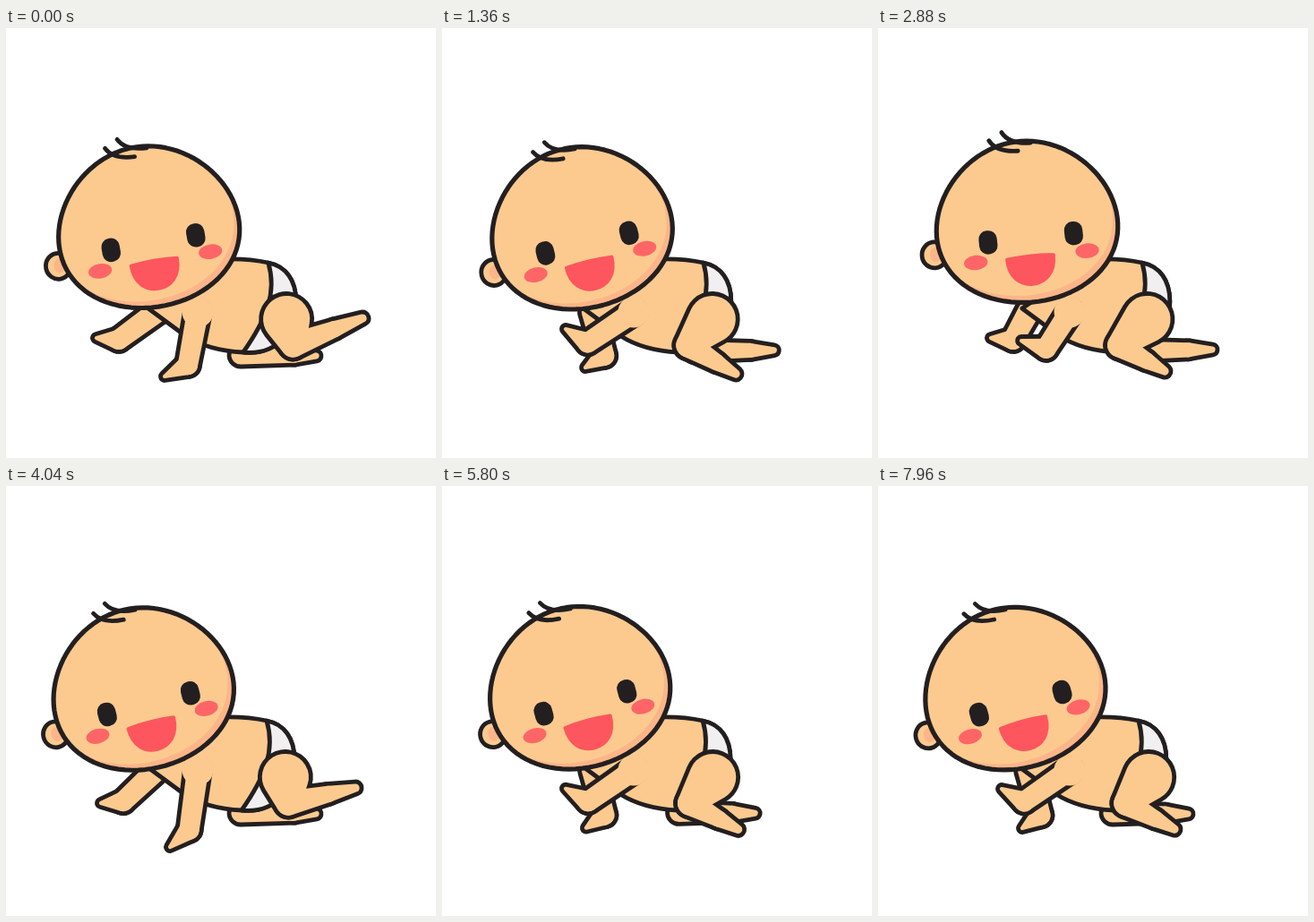
Recreate the animation shown at these times as an HTML page with a canvas. Size 480 by 480 pixels, loop 8 s.

```html
<!DOCTYPE html>
<html lang="en">
<head>
<meta charset="utf-8">
<title>Crawling baby</title>
<style>
html, body { margin: 0; width: 100%; height: 100%; overflow: hidden; background: #fff; }
canvas { display: block; width: 480px; height: 480px; }
</style>
</head>
<body>
<canvas id="stage" width="480" height="480"></canvas>
<script>
const ctx = document.getElementById('stage').getContext('2d');
const LOOP = 8000, STEP = 40, CRAWL = 2135, LINE = 4.8;
const INK = '#231f20', SKIN = '#fcca8f', SHADE = '#fcb588', BLUSH = '#fe6567', RED = '#fd565e', CLOTH = '#f1efef';
const RAD = Math.PI / 180;

// Key moments of one crawl: tips of the hands and near foot, and how far the far foot trails
const crawl = [
  { at: 0, near: [177, 389], far: [101, 346], toe: [398, 324], trail: 0 },
  { at: 315, near: [173, 384], far: [100, 338], toe: [392, 340], trail: .9 },
  { at: 745, near: [160, 349], far: [126, 346], toe: [320, 383], trail: 1 },
  { at: 1360, near: [138, 336], far: [160, 379], toe: [328, 386], trail: .9 },
  { at: 1555, near: [138, 338], far: [161, 382], toe: [331, 383], trail: 0 },
  { at: 1905, near: [183, 403], far: [106, 354], toe: [390, 337], trail: 0 }
];

const mix = (a, b, u) => a + (b - a) * u;
const mixPoint = (p, q, u) => [mix(p[0], q[0], u), mix(p[1], q[1], u)];

function poseAt(t) {
  const phase = t % CRAWL;
  const i = crawl.findLastIndex(key => key.at <= phase);
  const a = crawl[i], b = crawl[(i + 1) % crawl.length];
  const u = (phase - a.at) / ((b.at || CRAWL) - a.at);
  return {
    near: mixPoint(a.near, b.near, u),
    far: mixPoint(a.far, b.far, u),
    toe: mixPoint(a.toe, b.toe, u),
    trail: mix(a.trail, b.trail, u)
  };
}

// Head sway from -1 to 1; it starts smaller and ahead of the steady rhythm
function swayAt(t) {
  const lead = .9 * Math.max(0, 1 - (t / 2400) ** 2);
  const size = mix(.65, 1, Math.min(1, t / 2900));
  return size * Math.cos(2 * Math.PI * (t - 4940) / 2060 + lead);
}

function paint(path, fill, width = LINE, color = INK) {
  if (fill) { ctx.fillStyle = fill; ctx.fill(path); }
  if (width) { ctx.lineWidth = width; ctx.strokeStyle = color; ctx.stroke(path); }
}

function oval(x, y, rx, ry, fill, width = 0) {
  const path = new Path2D();
  path.ellipse(x, y, rx, ry, 0, 0, 2 * Math.PI);
  paint(path, fill, width);
}

// Tapered capsule around two circles
function capsule([ax, ay], ra, [bx, by], rb) {
  const path = new Path2D(), angle = Math.atan2(by - ay, bx - ax);
  const open = Math.acos((ra - rb) / Math.hypot(bx - ax, by - ay));
  path.arc(ax, ay, ra, angle + open, angle - open + 2 * Math.PI);
  path.arc(bx, by, rb, angle - open, angle + open);
  path.closePath();
  return path;
}

// Chain of joints [point, radius] with one common outline
function limb(...joints) {
  for (const [grow, color] of [[LINE / 2, INK], [-LINE / 2, SKIN]]) {
    for (let i = 1; i < joints.length; i++) {
      const [a, ra] = joints[i - 1], [b, rb] = joints[i];
      paint(capsule(a, ra + grow, b, rb + grow), color, 0);
    }
  }
}

// The hand tilts with its height above or below its rest level
function arm(shoulder, tip, length, level) {
  const tilt = 1.1 * (level - tip[1]) * RAD;
  const wrist = [tip[0] + length * Math.cos(tilt), tip[1] + length * Math.sin(tilt)];
  limb([shoulder, 14.5], [wrist, 13.5], [tip, 4.5]);
}

function nearLeg(toe) {
  const knee = [271 + .65 * (toe[0] - 322), 354];
  const hip = [301 + .25 * (knee[0] - 272), 325];
  limb([hip, 28.5], [knee, 16], [mixPoint(knee, toe, .6), 11.5], [toe, 7]);
}

function farLeg(trail) {
  const knee = [262 + 22 * trail, 365 - 5 * trail];
  const toe = [346 + 27 * trail, 366 - 7 * trail];
  limb([knee, 13], [mixPoint(knee, toe, .7), 10.5], [toe, 6]);
}

const bum = 'C312,266 323,282 323,305 C323,335 305,366 264,362';
const torso = new Path2D('M240,258 Q270,257 292,262 ' + bum + ' Q225,360 200,344 L158,313 Z');
const diaper = new Path2D('M292,262 ' + bum + ' C290,325 302,295 292,262 Z');
const mouth = new Path2D('M-26,40 Q0,37 26,40 C26,60 14,70 0,70 C-14,70 -26,60 -26,40 Z');
const hair = new Path2D('M-17,-102 Q-10,-88 14,-87');

// Egg shape, wider towards the chin
const skull = new Path2D();
for (let a = 0; a < 360; a += 4) {
  const s = Math.sin(a * RAD);
  skull.lineTo(101 * Math.cos(a * RAD) * (1 + .09 * s), 90 * s);
}
skull.closePath();

function drawBody(t) {
  const pose = poseAt(t), shoulder = [214, 317];
  farLeg(pose.trail);
  arm([168, 317], pose.far, 25, 350);
  ctx.save();
  ctx.translate(.8 + 2 * swayAt(t), 0);
  paint(torso, SKIN);
  paint(diaper, CLOTH);
  ctx.restore();
  nearLeg(pose.toe);
  arm(shoulder, pose.near, 29, 365);
  oval(...shoulder, 17.5, 17.5, SKIN);
}

function drawHead(t) {
  ctx.save();
  ctx.translate(158.5 + 7.2 * swayAt(t), 221 - 5 * swayAt(t - 80));
  ctx.rotate((4.6 * swayAt(t + 80) - 10.6) * RAD);

  oval(-106, 26, 14, 14.5, SKIN, LINE);
  oval(-105, 26, 6, 8, SHADE);

  ctx.save();
  ctx.clip(skull);
  paint(skull, SHADE, 0);
  ctx.translate(-5, -8);
  paint(skull, SKIN, 0);
  ctx.restore();
  paint(skull, null, 5.2);

  for (const i of [0, 1]) {
    ctx.save();
    ctx.translate(-15 * i, 7.5 * i);
    paint(hair, null);
    ctx.restore();
  }
  for (const side of [-1, 1]) {
    const eye = new Path2D();
    eye.roundRect(3 + 48 * side - 10.2, 5.3, 20.4, 26.4, 9.5);
    paint(eye, INK, 0);
    oval(1.5 + 62.5 * side, 39.5, 13.2, 8.2, BLUSH);
  }
  paint(mouth, RED, 4, RED);
  ctx.restore();
}

function draw(now) {
  const t = Math.floor((now % LOOP) / STEP) * STEP;
  ctx.fillStyle = '#fff';
  ctx.fillRect(0, 0, 480, 480);
  ctx.lineCap = ctx.lineJoin = 'round';
  drawBody(t);
  drawHead(t);
}

let start;
function tick(now) {
  start ??= now;
  draw(Math.max(0, now - start));
  requestAnimationFrame(tick);
}
draw(0);
requestAnimationFrame(tick);
</script>
</body>
</html>
```
